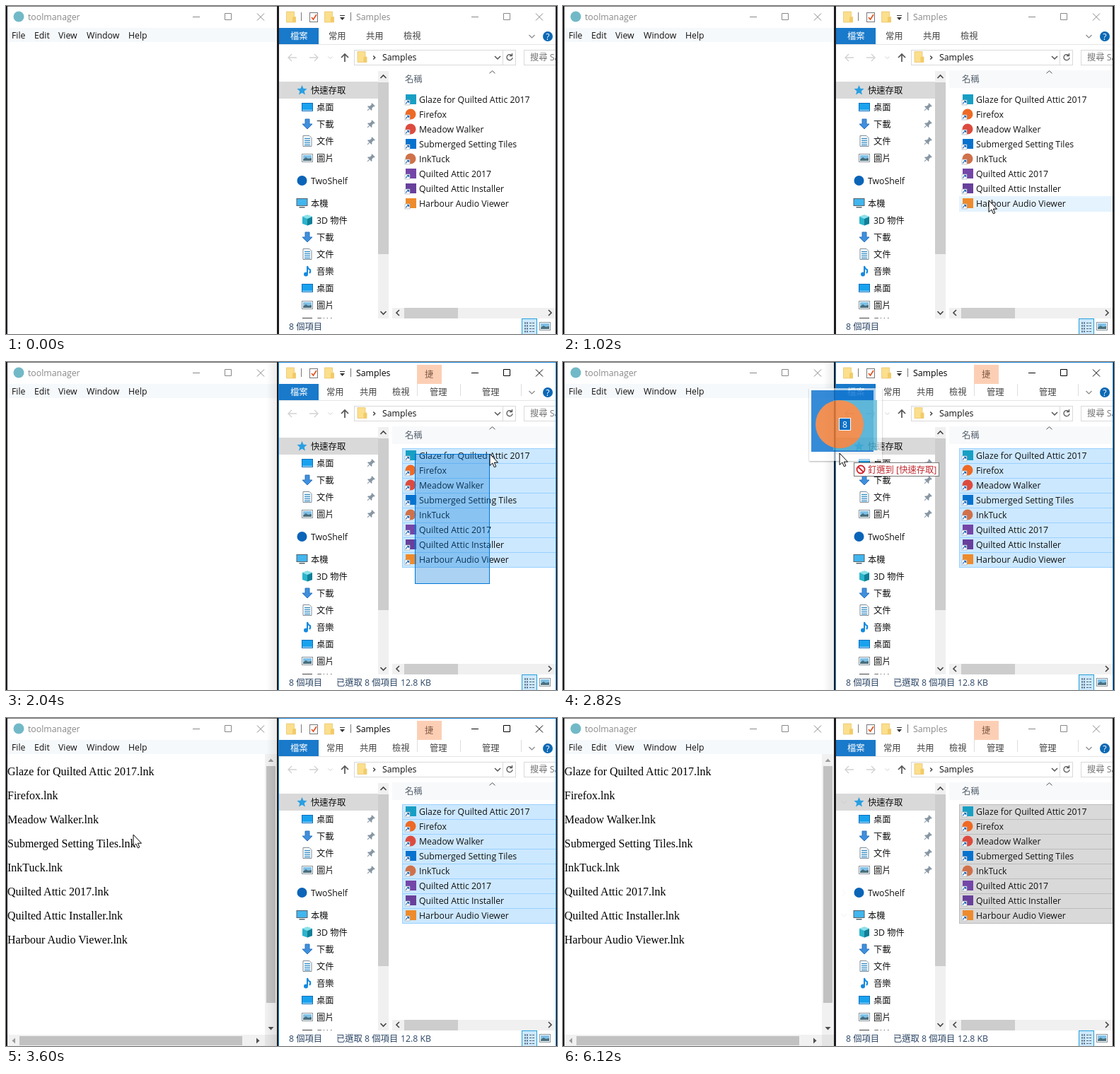
An HTML page that plays this animation: 779 px wide and 464 px high, repeating every 6180 ms.

```html
<!DOCTYPE html>
<html lang="zh-Hant">
<head>
<meta charset="utf-8">
<title>Drag files into toolmanager</title>
<style>
html, body { margin: 0; width: 100%; height: 100%; overflow: hidden; background: #fff; }
svg { display: block; width: 779px; height: 464px; }
text { font: 12.3px "Open Sans", "Noto Sans CJK TC", "Noto Sans CJK", sans-serif; white-space: pre; }
text.doc { font: 16px "Liberation Serif", "Times New Roman", serif; }
</style>
</head>
<body>
<svg id="stage" viewBox="0 0 779 464"></svg>
<script>
const LOOP = 6180, STEP = 60;
const stage = document.getElementById('stage');

const files = [
  ['Glaze for Quilted Attic 2017', '#189fc4', 0],
  ['Firefox', '#ee6a25', 1],
  ['Meadow Walker', '#dd4b3e', 1],
  ['Submerged Setting Tiles', '#0873ce', 0],
  ['InkTuck', '#d0714a', 1],
  ['Quilted Attic 2017', '#7446a8', 0],
  ['Quilted Attic Installer', '#68409b', 0],
  ['Harbour Audio Viewer', '#ee8b2c', 0]
];

// [centre y, label, icon, indent level, pinned]
const places = [
  [119, '快速存取', 'star', 0], [143, '桌面', 'desk', 1, 1], [167, '下載', 'down', 1, 1],
  [191, '文件', 'page', 1, 1], [215, '圖片', 'pic', 1, 1], [247, 'TwoShelf', 'disc', 0],
  [279, '本機', 'pc', 0], [303, '3D 物件', 'cube', 1], [327, '下載', 'down', 1],
  [351, '文件', 'page', 1], [375, '音樂', 'note', 1], [399, '桌面', 'desk', 1],
  [423, '圖片', 'pic', 1], [447, '影片', 'film', 1]
];

const rect = (x, y, w, h, fill, more = '') =>
  `<rect x="${x}" y="${y}" width="${w}" height="${h}" fill="${fill}" ${more}/>`;
const disc = (x, y, r, fill, more = '') => `<circle cx="${x}" cy="${y}" r="${r}" fill="${fill}" ${more}/>`;
const path = (d, fill, more = '') => `<path d="${d}" fill="${fill}" ${more}/>`;
const line = (d, color, w = 1, more = '') => path(d, 'none', `stroke="${color}" stroke-width="${w}" ${more}`);
const text = (x, y, s, fill = '#111', more = '') => `<text x="${x}" y="${y}" fill="${fill}" ${more}>${s}</text>`;
const group = (id, body, more = '') => `<g id="${id}" ${more}>${body}</g>`;
const at = (x, y, body) => `<g transform="translate(${x} ${y})">${body}</g>`;

// Icons are centred on 0,0
const icons = {
  star: path('M0-7 2-2.3 7-2 3.2 1.4 4.5 6.5 0 3.7-4.5 6.5-3.2 1.4-7-2-2-2.3Z', '#2a9fe2'),
  desk: rect(-8, -6, 16, 12, '#0b6fbf') + rect(-7, -5, 14, 9, '#19a2ee') + rect(-7, 4, 14, 1, '#bfe3f7'),
  down: path('M-3-7H3V0H7L0 7-7 0H-3Z', '#3f8fdd', 'stroke="#2f75bd"'),
  page: path('M-6-7.5H3L6-4.5V7.5H-6Z', '#fff', 'stroke="#7d8b96"') +
    line('M-4-3.5H4M-4-.5H4M-4 2.5H4M-4 5.5H4', '#3d93c9', 1.4),
  pic: rect(-7.5, -5.5, 15, 11, '#fff', 'stroke="#8b959c"') + rect(-6, -4, 12, 8, '#7fc1e8') +
    path('M-6 4V2L-2-1 1 1 6 0V4Z', '#4a6f7d'),
  disc: disc(0, 0, 7, '#0a64b8'),
  pc: rect(-7.5, -6.5, 15, 10, '#42b6ee', 'stroke="#53636e"') + rect(-4, 5, 8, 1.5, '#53636e'),
  cube: path('M0-7.5 7-5V5L0 7.5-7 5V-5Z', '#2cb5cb') + path('M0-2 7-5V5L0 7.5Z', '#117f98') +
    path('M0-7.5 7-5 0-2-7-5Z', '#8de1ea'),
  note: disc(-2, 4.5, 3, '#168ade') + line('M0 4.5V-7Q1-3 4-2 5 1 3 3', '#168ade', 2),
  film: rect(-7, -6, 14, 12, '#444') + rect(-4, -5, 8, 10, '#8bbfdc'),
  folder: path('M-6.5-7.5H4.5V0H6.5V7.5H-6.5Z', '#fbdf8c', 'stroke="#e6c068" stroke-width=".7"') +
    path('M2 0H6.5V7.5H2Z', '#f3cb66'),
  pin: `<g transform="rotate(45)">${path('M-3-5H3V-3.5H2V0L4 2V3H-4V2L-2 0V-3.5H-3Z', '#8796a3')}${line('M0 3V7', '#8796a3')}</g>`
};

const shortcut = rect(-8, 1, 7, 7, '#fff', 'stroke="#9aa7b3" stroke-width=".6"') +
  line('M-6.5 6.5Q-6 3.5-2.5 3.5M-5 2.5H-2.5V5', '#1762b5', 1.2);
const fileIcon = (color, round) =>
  (round ? disc(0, 0, 7.5, color) : rect(-7, -7, 15, 14, color)) + shortcut;

const arrow = (x, y, dx, dy, color = '#444', w = 1.6, r = 4) =>
  line(dx ? `M${x - r / 2 * dx} ${y - r}L${x + r / 2 * dx} ${y}L${x - r / 2 * dx} ${y + r}`
          : `M${x - r} ${y - r / 2 * dy}L${x} ${y + r / 2 * dy}L${x + r} ${y - r / 2 * dy}`, color, w);

const windowButtons = (x, color) => line(
  `M${x} 15.5h10M${x + 45.5} 10.5h9v9h-9zM${x + 91} 10.5l10 10M${x + 101} 10.5l-10 10`, color);

const triangle = (x, y, angle, color = '#505050') =>
  `<path d="M-4 2H4L0-2.5Z" fill="${color}" transform="translate(${x} ${y}) rotate(${angle})"/>`;

const toolWindow =
  rect(2, 0, 381, 464, '#fff') + rect(2, 0, 381, 1, '#777') +
  disc(18, 15, 7.5, '#72b9c7') + text(31, 20, 'toolmanager', '#888') + windowButtons(264, '#888') +
  rect(2, 31, 381, 20, '#f6f9fb') +
  [[8, 'File'], [40, 'Edit'], [74, 'View'], [114, 'Window'], [173, 'Help']]
    .map(([x, s]) => text(x, 46, s)).join('') +
  group('dropped',
    files.map(([name], i) => text(2, 81 + 34 * i, name + '.lnk', '#000', 'class="doc"')).join('') +
    rect(366, 51, 17, 413, '#f1f1f1') + rect(2, 448, 364, 16, '#f1f1f1') + rect(366, 448, 17, 16, '#e4e4e4') +
    rect(368, 68, 13, 335, '#c1c1c1') + rect(19, 450, 315, 13, '#c1c1c1') +
    triangle(374.5, 60, 0, '#999') + triangle(374.5, 439, 180) +
    triangle(11, 456.5, -90, '#999') + triangle(356, 456.5, 90)) +
  rect(368, 0, 15, 464, 'url(#edgeShade)', 'id="edge"');

const tabs = xs => ['常用', '共用', '檢視'].map((s, i) => text(xs[i], 47, s, '#444')).join('');

const navRow = ([y, label, icon, level, pinned]) =>
  at(level ? 426 : 418.5, y, icons[icon]) + text(level ? 439 : 431, y + 4.5, label) +
  (pinned ? at(516, y, icons.pin) : '');

const chevrons = places.map(([y, , , level], i) => {
  if (!level) return i === 5 ? arrow(397, y, 1, 0, '#aaa', 1.2) : arrow(397, y, 0, 1, '#777', 1.2);
  return y > 290 ? arrow(405, y, 1, 0, '#c8c8c8', 1.2) : '';
}).join('');

const explorer =
  rect(386, 0, 391, 464, '#fff') + rect(386, 0, 391, 1, '#777') +
  at(403, 15.5, icons.folder) + line('M417.5 9V21M487.5 9V21', '#777') +
  rect(429.5, 9.5, 11, 13, '#fff', 'stroke="#777"') + line('M432 16L434.5 19 439 12', '#e0592a', 1.8) +
  at(457, 15.5, icons.folder) + line('M472 13.5H479', '#333') + path('M472 16H479L475.5 20Z', '#333') +
  text(495, 20, 'Samples', '#000', 'id="title"') +
  group('buttonsOff', windowButtons(658, '#888')) + group('buttonsOn', windowButtons(658, '#000')) +
  rect(386, 31, 56, 23, '#1979ca') + text(402, 47, '檔案', '#fff') +
  group('plainTabs', tabs([456, 509, 562])) +
  group('contextTabs', rect(581, 4, 35, 27, '#fccfb5') + text(592, 22, '捷', '#805a45') +
    tabs([453, 500, 546]) + text(599, 47, '管理', '#444') + text(673, 47, '管理', '#444') +
    line('M581.5 31V48M642.5 31V48M728.5 31V48', '#ddd')) +
  arrow(743.5, 43, 0, 1, '#888', 1.2) + disc(766, 43, 7, '#0b69b5') +
  text(766, 47.5, '?', '#fff', 'text-anchor="middle" font-weight="700"') +
  line('M386 54.5H777', '#e6e6e6') +
  line('M411 73H399M404 68L399 73 404 78M429 73H441M436 68L441 73 436 78', '#d2d2d2', 1.4) +
  arrow(458.5, 73, 0, 1, '#d2d2d2', 1, 3) + line('M479 79V68M474 73L479 68 484 73', '#555', 1.7) +
  rect(492.5, 62.5, 228, 21, '#fff', 'stroke="#d9d9d9"') + line('M702.5 63V83', '#d9d9d9') +
  at(503.5, 72, icons.folder) + arrow(520.5, 73, 1, 0, '#444', 1.5, 2.5) + text(532, 77, 'Samples') +
  arrow(695, 73, 0, 1, '#555', 1.5) +
  line('M714.5 69.5A4 4 0 1 0 716 73M715.5 67V70.5H712', '#555', 1.3) +
  rect(732.5, 62.5, 50, 21, '#fff', 'stroke="#d9d9d9"') + text(741, 77, '搜尋 Sa', '#777') +
  group('nav', rect(386, 107, 140, 24, '#d9d9d9') + rect(386, 0, 140, 24, '#e5f3ff', 'id="navHover"') +
    places.map(navRow).join('') + group('chevrons', chevrons), 'clip-path="url(#navClip)"') +
  rect(526, 92, 15, 350, '#f0f0f0') + rect(526, 108, 15, 243, '#cdcdcd') +
  arrow(533.5, 100, 0, -1) + arrow(533.5, 434, 0, 1) +
  rect(546, 91, 231, 25, '#f8f9fb', 'id="header"') + text(564, 108, '名稱', '#55616e') +
  arrow(687.5, 93.5, 0, -.9, '#555', 1) +
  files.map(([name, color, round], i) =>
    rect(560.5, 122.5 + 21 * i, 220, 21, '#cce8ff', `id="row${i}"`) +
    at(572, 132 + 21 * i, fileIcon(color, round)) + text(584, 137 + 21 * i, name)).join('') +
  rect(546, 427, 231, 15, '#f0f0f0') + rect(563, 427, 76, 15, '#cdcdcd') +
  arrow(554, 434, -1, 0) + arrow(769, 434, 1, 0) +
  text(400, 458, '8 個項目', '#2b4565') +
  group('count', text(467, 458, '已選取 8 個項目', '#2b4565') + text(558, 458, '12.8 KB', '#2b4565')) +
  rect(729.5, 442.5, 21, 22, '#cce8ff', 'stroke="#26a0da"') +
  line('M733 448.5H738M733 452.5H738M733 456.5H738M733 460.5H738', '#567', 2, 'stroke-dasharray="2 1"') +
  line('M740 448.5H747M740 452.5H747M740 456.5H747M740 460.5H747', '#567', 1, 'stroke-dasharray="3 1"') +
  at(762, 453, icons.pic);

const tip = (id, w, body) =>
  group(id, rect(20.5, 13.5, w, 19, '#fff', 'stroke="#777"') + body);

// Dragged stack, placed relative to the pointer tip
const dragImage = group('drag',
  `<g opacity=".85">${rect(-43, -92, 103, 103, '#fff', 'filter="url(#shadow)" opacity=".75"')}` +
  rect(-40, -89, 88, 87, '#1477d1') + rect(-9, -75, 62, 71, '#4ab3d3', 'opacity=".85"') +
  disc(0, -41, 34, '#ee7d38') + '</g>' +
  rect(-.5, -49.5, 16, 17, '#0c70c4', 'stroke="#fff"') +
  text(7.5, -36.5, '8', '#fff', 'text-anchor="middle"') +
  tip('pinTip', 120, disc(30, 23, 5.5, 'none', 'stroke="#d3202a" stroke-width="1.8"') +
    line('M26 19L34 27', '#d3202a', 1.8) + text(40, 27.5, '釘選到 [快速存取]', '#c1272d')) +
  tip('copyTip', 48, line('M30 18V28M25 23H35', '#1762b5', 2) + text(40, 27.5, '複製', '#1762b5')));

const pointer = group('pointer',
  group('arrowCursor', path('M0 0V16.5L3.8 13 6.4 18.8 8.8 17.8 6.3 12.2H11.5Z', '#fff', 'stroke="#000"')) +
  group('handCursor', path('M0 13V1.6a1.6 1.6 0 0 1 3.2 0V8l7 1.4q2.2.6 2.2 2.6v3l-2 4v3H2.5v-3L-3 14q-1-2 1-2.4z',
    '#fff', 'stroke="#000" stroke-width="1.2"') + line('M6 9V12M9 9.5V12', '#000')));

stage.innerHTML =
  `<defs><clipPath id="navClip"><path d="M386 92H526V442H386Z"/></clipPath>
  <linearGradient id="edgeShade"><stop stop-opacity="0"/><stop offset="1" stop-opacity=".08"/></linearGradient>
  <filter id="shadow"><feDropShadow dx="0" dy="1" stdDeviation="1.2" flood-opacity=".5"/></filter></defs>` +
  rect(0, 0, 779, 464, '#1c1c20') + toolWindow + explorer +
  rect(777, 0, 2, 464, '#1c1c20') +
  line('M385.5 464V.5H777.5V464', '#1883d7', 1, 'id="frame"') +
  rect(0, 0, 0, 0, '#0078d7', 'id="marquee" fill-opacity=".33" stroke="#0078d7"') +
  dragImage + pointer;

const el = id => document.getElementById(id);
const set = (id, attrs) => { for (const k in attrs) el(id).setAttribute(k, attrs[k]); };
const show = (id, on) => set(id, { visibility: on ? 'visible' : 'hidden' });
const between = (t, a, b) => t >= a && t < b;
const clamp = v => Math.max(0, Math.min(1, v));

// time, x, y of the pointer tip
const track = [
  [480, 770, 66], [720, 712, 135], [1020, 602, 275], [1200, 578, 314], [1260, 578, 314],
  [1800, 684, 129], [2100, 684, 130], [2400, 625, 131], [2580, 625, 131], [2640, 610, 131],
  [2820, 391, 129], [3060, 172, 158], [3240, 180, 165], [4620, 180, 165], [4980, 472, 152],
  [5100, 560, 140], [5280, 690, 100], [5460, 745, 60], [5640, 778, 32]
];

function tipAt(t) {
  const i = track.findIndex(k => k[0] > t);
  if (i < 1) return track[i < 0 ? track.length - 1 : 0].slice(1);
  const [a, b] = [track[i - 1], track[i]];
  const p = (t - a[0]) / (b[0] - a[0]);
  return [a[1] + (b[1] - a[1]) * p, a[2] + (b[2] - a[2]) * p];
}

function render(t) {
  const [x, y] = tipAt(t);
  const active = between(t, 1200, 6120);
  const context = t >= 1800;
  const dragging = between(t, 2640, 3600);
  const selecting = between(t, 1260, 2100);
  const visible = between(t, 480, 5640);

  set('title', { fill: active ? '#000' : '#888' });
  show('buttonsOn', active);
  show('buttonsOff', !active);
  show('frame', active);
  show('edge', active);
  show('plainTabs', !context);
  show('contextTabs', context);
  show('count', context);
  show('header', t >= 480);
  show('dropped', t >= 3600);

  files.forEach((_, i) => {
    const top = 122 + 21 * i;
    const selected = t >= 1260 && (t >= 1800 || y < top + 21);
    const hover = between(t, 480, 1260) && x > 560 && between(y, top, top + 21);
    show('row' + i, selected || hover);
    set('row' + i, {
      fill: !selected ? '#e5f3ff' : active ? '#cce8ff' : '#d9d9d9',
      stroke: !selected ? '#e5f3ff' : active ? '#99d1ff' : '#bcbcbc'
    });
  });

  show('marquee', selecting);
  if (selecting) set('marquee', {
    x: 578.5, y: Math.round(y) + .5,
    width: Math.max(0, Math.round(x) - 579), height: Math.max(0, 313 - Math.round(y))
  });

  const overNav = visible && !dragging && between(x, 386, 526);
  const place = overNav && places.find(p => Math.abs(y - p[0]) <= 12);
  show('navHover', place && place[0] > 131);
  if (place) set('navHover', { y: place[0] - 12 });
  set('chevrons', { opacity: t < 5340 ? clamp((t - 4800) / 180) : Math.max(.07, clamp((5640 - t) / 300)) });

  const move = { transform: `translate(${Math.round(x)} ${Math.round(y)})` };
  set('drag', move);
  set('pointer', move);
  show('drag', dragging);
  show('pinTip', dragging && between(x, 386, 526));
  show('copyTip', dragging && x < 383);
  show('arrowCursor', visible && !overNav);
  show('handCursor', overNav);
}

const start = performance.now();
function tick() {
  const t = (performance.now() - start) % LOOP;
  render(Math.floor(t / STEP) * STEP);
  requestAnimationFrame(tick);
}
tick();
</script>
</body>
</html>
```
